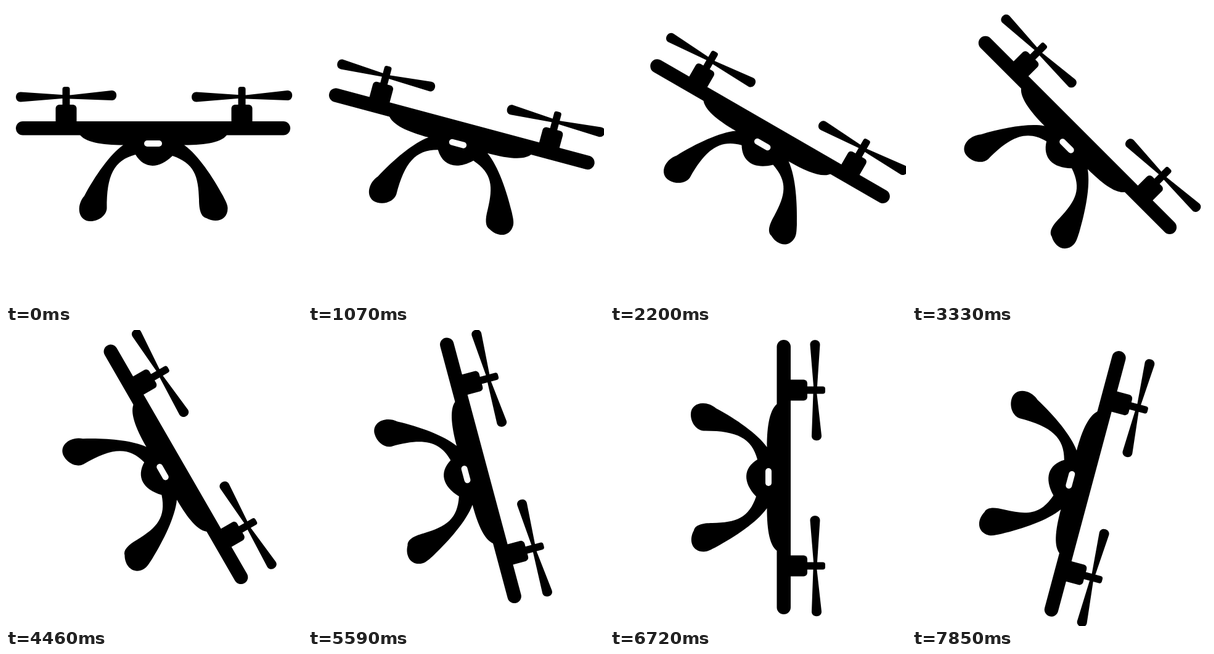
Animation of 480 by 480 pixels, one loop 8000 ms. Source, as an HTML page:

```html
<!DOCTYPE html>
<html lang="en">
<head>
<meta charset="utf-8">
<title>Turning drone</title>
<style>
  html, body { margin: 0; width: 100%; height: 100%; overflow: hidden; background: #fff; }
  svg { display: block; width: 100%; height: 100%; }
</style>
</head>
<body>
<svg viewBox="0 0 480 480">
  <defs>
    <g id="rotor">
      <path d="M24 139.5 L91 144 L104 144.500 L171 137 C181.500 136 182 152.500 172 153 L104 150.500 L91 150 L24 155.5 C13.500 156 13.500 139 24 139.5Z"/>
      <rect x="91.5" y="131" width="12" height="40" rx="4"/>
      <rect x="80.5" y="160" width="34" height="40" rx="6"/>
    </g>
  </defs>
  <g id="drone">
    <use href="#rotor"/>
    <use href="#rotor" x="285"/>
    <rect x="16" y="187" width="445" height="22.5" rx="11.25"/>
    <!-- hull, legs and camera dome -->
    <path d="M118.5 207 C127 221 155 225.5 190 225.5
      C169 240 144 276 127 308 C113 324 117 349 137 349 C151 349 163 339 163.500 328
      C163 275 175 250 210 241 C224 264 247 265 270 243
      C305 255 312 275 313 314 C313 330 316 342 325 344
      C341 353 359.500 347 359.500 328 C359.500 322 356 316 352 308
      C335 277 312 242 289 225.5 C325 225.5 352 221 359.500 207Z"/>
    <rect x="224" y="218" width="29" height="10" rx="5" fill="#fff"/>
  </g>
</svg>
<script>
  const LOOP = 8000, FIRST_HOLD = 1070, HOLD = 1130, STEP_DEGREES = 15;
  const drone = document.getElementById("drone");
  const start = performance.now();

  function draw() {
    const time = (performance.now() - start) % LOOP;
    const step = Math.max(0, Math.floor((time - FIRST_HOLD) / HOLD) + 1);
    drone.setAttribute("transform", `rotate(${step * STEP_DEGREES} 240 240)`);
    requestAnimationFrame(draw);
  }
  draw();
</script>
</body>
</html>
```
